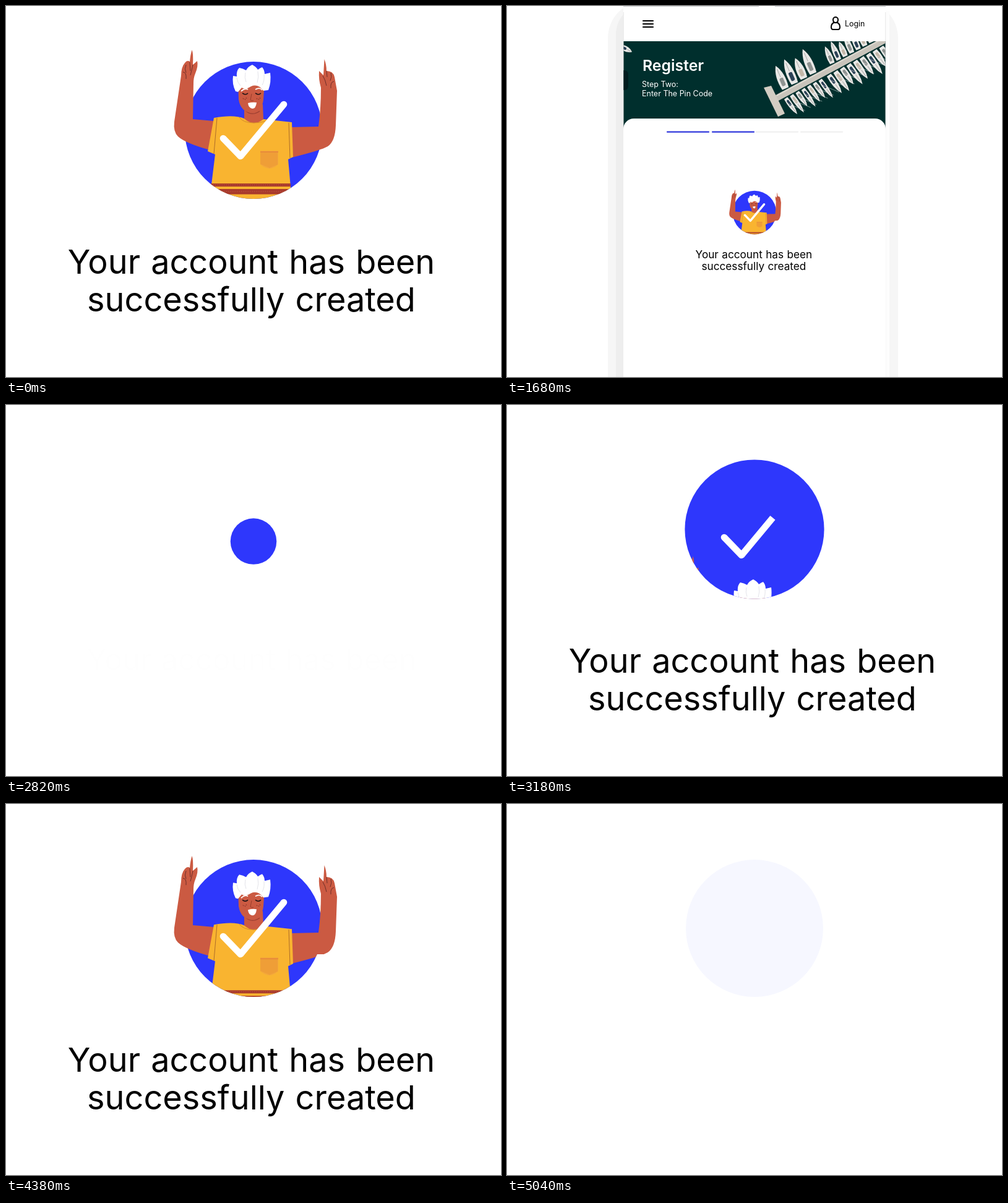
These frames come from a looping animation (800x600 px, 5.37 s). An HTML page with a canvas:

```html
<!DOCTYPE html>
<html lang="en">
<head>
<meta charset="utf-8">
<title>Account created</title>
<style>
html, body { margin: 0; width: 100%; height: 100%; overflow: hidden; background: #fff; }
canvas { display: block; }
</style>
</head>
<body>
<canvas id="stage" width="800" height="600"></canvas>
<script>
const ctx = document.getElementById('stage').getContext('2d');
const LOOP = 5370, CYCLE = 2700, HOLD = 5040;
const MINI = 0.318, ZOOM = 1 / MINI, ZOOM_Y = 396;
const BLUE = '#2e37fc', SKIN = '#cb5a42', SHIRT = '#f9b430', RED = '#a83a2c', WATER = '#002f2d';

const ramp = (t, a, b) => Math.min(1, Math.max(0, (t - a) / (b - a)));
const inOutQuint = u => u < 0.5 ? 16 * u ** 5 : 1 - 16 * (1 - u) ** 5;
const outBack = (u, c = 0.7) => 1 - (c + 1) * (1 - u) ** 3 + c * (1 - u) ** 2;

function fill(d, color) {
  ctx.fillStyle = color;
  ctx.fill(new Path2D(d));
}
function stroke(d, color, width) {
  ctx.strokeStyle = color;
  ctx.lineWidth = width;
  ctx.stroke(new Path2D(d));
}
function box(x, y, w, h, color, r = 0) {
  ctx.fillStyle = color;
  ctx.beginPath();
  ctx.roundRect(x, y, w, h, r);
  ctx.fill();
}
function disc(x, y, r, color) {
  ctx.fillStyle = color;
  ctx.beginPath();
  ctx.arc(x, y, r, 0, 7);
  ctx.fill();
}
function label(text, x, y, size, color, weight = 400, align = 'left') {
  ctx.font = `${weight} ${size}px Inter, sans-serif`;
  ctx.textAlign = align;
  ctx.fillStyle = color;
  ctx.fillText(text, x, y);
}

// Boat seen from above: stern at the origin, bow along +x
function boat(x, y, angle, len, width, i) {
  ctx.save();
  ctx.translate(x, y);
  ctx.rotate(angle);
  const w = width / 2;
  fill(`M0 ${-w * 0.8}Q${len * 0.6} ${-w * 1.4} ${len} 0Q${len * 0.6} ${w * 1.4} 0 ${w * 0.8}Z`, '#e9e8e6');
  box(len * 0.12, -w * 0.45, len * 0.34, w * 0.9, ['#8f9391', '#2c4257', '#c3b7a8'][i % 3], 2);
  stroke(`M${len * 0.5} 0H${len * 0.85}`, '#a9aaa8', 1);
  ctx.restore();
}

// Rows of moored boats: side -1 lies above the pier, side 1 below it
function row(from, to, step, len, width, side) {
  const angle = side > 0 ? 0.95 : -1.98;
  for (let d = from, i = 0; d <= to; d += step, i++) {
    const off = side * 7;
    const x = 434 + 0.881 * d + 0.473 * off, y = 150 - 0.473 * d + 0.881 * off;
    boat(x, y, angle, len + Math.sin(i * 2.4) * 4, width, i + (side > 0));
    if (side > 0) stroke(`M${x + 4} ${y + 9}l27 11`, 'rgba(225,228,225,.6)', 0.9);
  }
}

function harbour() {
  ctx.save();
  ctx.beginPath();
  ctx.rect(188.5, 57, 423, 148);
  ctx.clip();
  box(188, 57, 424, 148, WATER);
  box(183, 104, 13, 32, '#001c1e', 6);
  boat(185, 66, 0.45, 19, 9, 1);
  row(22, 75, 17, 40, 14, -1);
  row(108, 205, 12, 30, 10, -1);
  row(15, 78, 10.5, 32, 8, 1);
  row(94, 200, 12, 36, 10, 1);
  stroke('M432 151L622 49', '#c9c4bb', 10);
  stroke('M436 145L622 45', '#e0dcd3', 1.5);
  fill('M415 132L427 129L449 174L438 179Z', '#d3cdc3');
  ctx.restore();
}

function phone() {
  box(163, -8, 469, 1000, '#f6f6f6', 60);
  box(176, -4, 442, 1000, '#eeeeee', 50);
  box(612, 8, 6, 1000, '#fdfdfd');
  box(188, 0, 424, 1000, '#fff');
  stroke('M188.3 10V1000M611.7 10V1000', '#dedede', 0.7);
  stroke('M188 0H407M433 0H612', '#8b9298', 1.2);

  ctx.lineCap = 'round';
  stroke('M220 24H236M220 29H236M220 34H236', '#000', 2.2);
  stroke('M527 22a4 4 0 1 1 8 0q0 5 -4 5q-4 0 -4 -5ZM528 27q-4 2 -4 7q0 4 3 4h8q3 0 3 -4q0 -5 -4 -7', '#000', 2);
  ctx.lineCap = 'butt';
  label('Login', 546, 33, 12.4, '#000');

  harbour();
  label('Register', 219, 105, 24.8, '#fff', 600);
  label('Step Two:', 218, 131, 12.5, '#fff');
  label('Enter The Pin Code', 218, 146, 12.5, '#fff');
  box(188, 182, 424, 800, '#fff', 17);
  [258, 331, 402, 474].forEach((x, i) => box(x, 202.5, 69, 2.3, i < 2 ? '#3038dc' : '#f0f0f0', 1));
}

function arms() {
  fill('M300.5 70Q303 76 302 94L309 88Q311 96 306 108Q303 115 303 124L302 182L336 185L330 232Q290 221 278 210Q270 202 272 186L283 112Q283 98 289 91Q293 86 297 89Q298 78 300.5 70Z', SKIN);
  fill('M514.5 85Q518 94 518 104Q529 104 531 114L535 136L533 192Q532 218 520 226Q510 232 462 244L461 195L505 194Q509 165 509 131Q505 118 506 104L513 111Z', SKIN);
  stroke('M297 90L298 104M291 94Q288 101 291 107M286 106Q292 106 291 117M302 94Q300 104 298 111M518 104L519 114M525 107Q527 114 524 120M530 121Q524 122 525 132M512 112Q516 118 518 128', '#632a27', 0.9);
}

function torso() {
  // shirt, neck, head
  fill('M336 180Q368 174 385 181Q400 190 416 182L462 187L464 243L456 247L460 292L464 360H324L332 288L338 239L326 234Z', SHIRT);
  stroke('M341 180L336 238M457 188L459 245', '#a5652a', 0.9);
  box(331, 286, 129, 5, RED);
  box(331, 295, 130, 8.5, RED);
  ctx.setLineDash([1, 2]);
  stroke('M332 288.5H459M332 299H460', '#c35b45', 1.2);
  ctx.setLineDash([]);
  fill('M385 158H415L416 182Q400 195 385 181Z', SKIN);
  stroke('M377 179Q383 188 400 188Q418 188 423 182', '#d38b2a', 1);
  stroke('M387 168Q397 178 410 169', '#9c3f31', 1.2);
  fill('M375 122L376 150Q379 170 397 172Q414 170 416 150L418 122Z', SKIN);
  fill('M371 137Q365 125 367 112L373 113Q372 104 377 99Q383 100 388 103Q391 97 398 94Q404 97 407 102Q411 99 414 98Q418 103 418 109L427 107Q429 122 424 135L416 136Q407 124 396 129Q387 135 381 131L375 138Z', '#fff');
  stroke('M373 115Q374 123 379 128M387 107Q385 115 388 122M407 105Q409 114 406 123M417 110Q418 120 414 127', '#dcdce4', 0.8);

  // face
  stroke('M380 137Q386 131 391 134M403 134Q410 130 414 135', '#fff', 1.8);
  stroke('M382 140Q387 144 391 140M403 140Q408 144 412 140', '#221416', 1.6);
  stroke('M397 141L395 151Q397 153 400 152', '#923929', 0.9);
  stroke('M383 148l1 2M386 149l1 2M388 147l1 2M405 148l1 2M408 149l1 2M410 147l1 2', '#7d2b24', 0.9);
  fill('M391 156Q398 154 405 155Q404 165 398 165Q392 164 391 156Z', '#fff');

  // pocket
  fill('M411 233H440V255Q434 261 426 262Q417 261 411 255Z', '#f4a93a');
  for (let x = 412; x < 440; x += 2) stroke(`M${x} 234V${261 - Math.abs(x - 426) * 0.42}`, '#e58a35', 0.7);
  stroke('M411 235H440', '#e88b3a', 2);
}

function bodyOffset(t) {
  if (t < 720) return 250 - 272 * Math.sin(ramp(t, 440, 720) * Math.PI / 2);
  const exit = ramp(t, 2020, 2220);
  return -22 * Math.cos((t - 720) / 701 * 2 * Math.PI) * (1 - exit) + 270 * exit ** 2;
}

// The arms travel slightly less than the body
function person(t, r) {
  const y = bodyOffset(t);
  ctx.save();
  ctx.beginPath();
  ctx.rect(200, -50, 400, 293);
  ctx.moveTo(400 + r, 201);
  ctx.arc(400, 201, r, 0, 2 * Math.PI);
  ctx.clip();
  ctx.translate(0, y * 0.93);
  arms();
  ctx.translate(0, y * 0.07);
  torso();
  ctx.restore();
}

function tick(p) {
  const first = 40.3, second = 109.3, len = p * (first + second);
  if (len <= 0) return;
  const a = Math.min(1, len / first), b = Math.max(0, (len - first) / second);
  disc(351, 214, 5.3, '#fff');
  ctx.lineJoin = 'round';
  stroke(`M351 214L${351 + 28 * a} ${214 + 29 * a}` + (b ? `L${379 + 70 * b} ${243 - 84 * b}` : ''), '#fff', 10.6);
  if (p === 1) disc(449, 159, 5.3, '#fff');
}

function message(text, y, alpha) {
  ctx.globalAlpha = alpha;
  ctx.wordSpacing = '2px';
  label(text, 396.5, y, 54, '#000', 400, 'center');
  ctx.wordSpacing = '0px';
  ctx.globalAlpha = 1;
}

function success(t) {
  const r = 111 * outBack(ramp(t, 60, 585));
  const shown = 1 - ramp(t, 2190, 2346);
  if (r > 0 && shown > 0) {
    ctx.globalAlpha = shown;
    disc(400, 201, r, BLUE);
    ctx.globalAlpha = 1;
    if (t > 440 && t < 2220) person(t, r);
    tick(Math.min(ramp(t, 250, 540), 1 - ramp(t, 2040, 2200)));
  }
  message('Your account has been', 433, ramp(t, 120, 360) * (1 - ramp(t, 2170, 2330)));
  message('successfully created', 494, ramp(t, 220, 460) * (1 - ramp(t, 2040, 2200)));
}

function draw(now) {
  const t = now % LOOP, poster = t < 30;
  const zoom = 1 + (ZOOM - 1) * (poster ? 1 : inOutQuint(ramp(t, 2356, 3120)));
  ctx.setTransform(1, 0, 0, 1, 0, 0);
  box(0, 0, 800, 600, '#fff');
  ctx.translate(400, ZOOM_Y);
  ctx.scale(zoom, zoom);
  ctx.translate(-400, -ZOOM_Y);
  if (zoom < 3) phone();
  ctx.translate(400, 334);
  ctx.scale(MINI, MINI);
  ctx.translate(-400, -201);
  success(poster ? 900 : t < CYCLE ? t : Math.min(t, HOLD) - CYCLE);
}

const start = performance.now();
function frame() {
  draw(performance.now() - start);
  requestAnimationFrame(frame);
}
frame();
</script>
</body>
</html>
```
